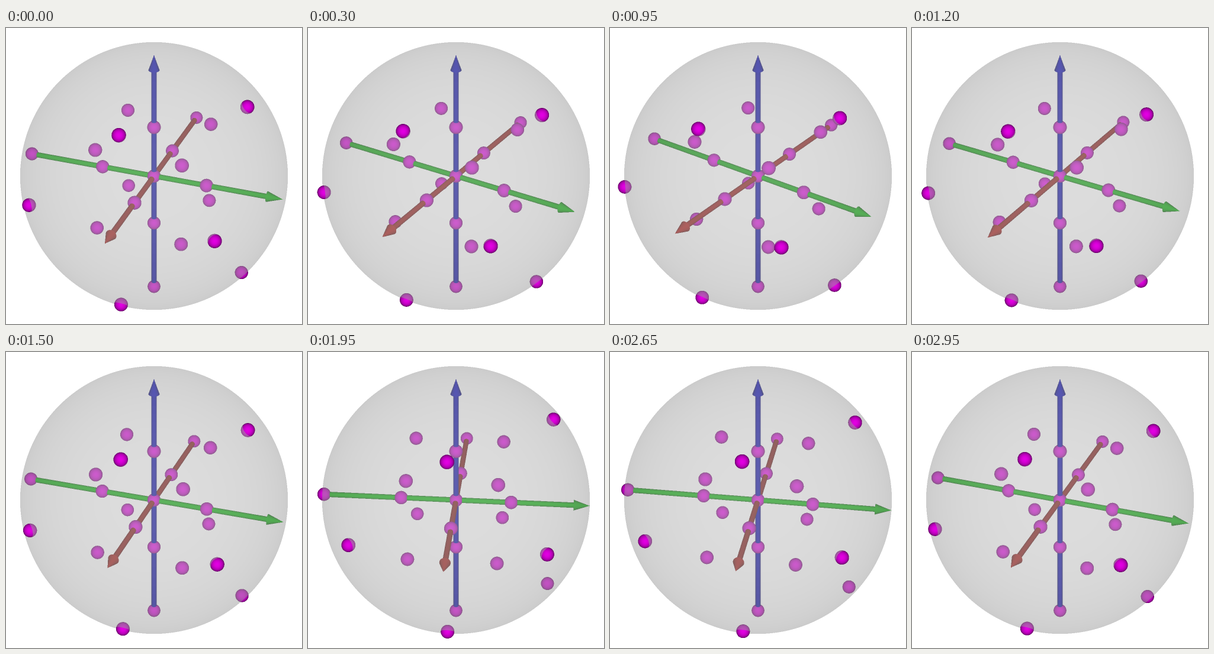
A matplotlib script for the animation above (3000 ms loop, 500x500 px).

```python
"""Octahedral rotation group as modified Rodrigues vectors in a glass unit ball."""
from itertools import product

import matplotlib.pyplot as plt
import numpy as np
from matplotlib.animation import FuncAnimation

SIZE, SS = 500, 2              # stage in pixels, supersampling per axis
FRAMES, INTERVAL = 60, 50
FOCAL, DIST = 2500.0, 11.1     # camera focal length (px) and distance
ELEV = np.radians(30)
MAGENTA = (226, 0, 226)
AXIS_COLORS = ((178, 16, 12), (0, 178, 0), (0, 0, 184))
BALL_R, SHAFT_R, HEAD_R, HEAD_LEN = 0.05, 0.02, 0.04, 0.12
GLASS = 0.5                    # opacity of the unit sphere

N = SIZE * SS
ray = (((np.arange(N) + 0.5) / SS - SIZE / 2) / FOCAL).astype(np.float32)


def rotation_points():
    """Axis times tan(angle / 4) for the 24 rotations of the cube."""
    eye = np.eye(3)
    pts = [np.zeros(3)]
    for e in eye:
        pts += [e * np.tan(np.pi / 8), -e * np.tan(np.pi / 8), -e]
    pts += [np.array(s) / 3 for s in product((-1, 1), repeat=3)]
    for i, j in ((0, 1), (0, 2), (1, 2)):
        pts += [(eye[i] + s * eye[j]) / np.sqrt(2) for s in (-1, 1)]
    return np.array(pts)


def view_matrix(azim):
    """Rows: right, up, towards the camera."""
    c, s = np.cos(azim), np.sin(azim)
    ce, se = np.cos(ELEV), np.sin(ELEV)
    return np.array([[-s, c, 0], [-se * c, -se * s, ce], [ce * c, ce * s, se]])


def azimuth(k):
    """Rock around 20 degrees along two parabolic arcs."""
    x = 2 * k / (FRAMES - 1) - 1
    return np.radians(20 - 17.15 * 4 * x * (1 - abs(x)))


def window(points, radius):
    """Pixel slices that enclose the points padded by a radius."""
    p = np.atleast_2d(points)
    scale = FOCAL / (DIST - p[:, 2])
    pad = radius * scale.max() + 2
    cols = SIZE / 2 + p[:, 0] * scale
    rows = SIZE / 2 - p[:, 1] * scale
    return tuple(slice(max(0, int((v.min() - pad) * SS)),
                       min(N, int((v.max() + pad) * SS) + 1))
                 for v in (rows, cols))


def rays(win):
    return ray[win[1]][None, :], -ray[win[0]][:, None]


def paint(img, depth, win, t, hit, cosine, color):
    d = depth[win]
    hit = hit & (t < d)
    d[hit] = t[hit]
    light = 0.3 + 0.7 * np.clip(cosine[hit], 0, 1)
    img[win][hit] = light[:, None] * np.array(color, np.float32)


def draw_ball(img, depth, center, radius, color):
    win = window(center, radius)
    x, y = rays(win)
    m = np.array([0, 0, DIST]) - center
    a = x * x + y * y + 1
    b = x * m[0] + y * m[1] - m[2]
    disc = b * b - a * (m @ m - radius ** 2)
    root = np.sqrt(np.maximum(disc, 0))
    paint(img, depth, win, (-b - root) / a, disc > 0,
          root / (radius * np.sqrt(a)), color)


def draw_frustum(img, depth, start, axis, length, r0, r1, color):
    win = window([start, start + axis * length], max(r0, r1))
    x, y = rays(win)
    k = (r1 - r0) / length
    g = 1 + k * k
    m = np.array([0, 0, DIST]) - start
    ma = m @ axis
    da = x * axis[0] + y * axis[1] - axis[2]
    dd = x * x + y * y + 1
    a = dd - g * da * da
    b = x * m[0] + y * m[1] - m[2] - da * (g * ma + k * r0)
    c = m @ m - g * ma * ma - 2 * k * r0 * ma - r0 ** 2
    disc = b * b - a * c
    root = np.sqrt(np.maximum(disc, 0))
    t = (-b - root) / a
    s = ma + t * da
    hit = (disc > 0) & (s >= 0) & (s <= length)
    normal = np.maximum(np.abs(r0 + k * s), 1e-4) * np.sqrt(g * dd)
    paint(img, depth, win, t, hit, root / normal, color)


def draw_arrow(img, depth, axis, color, pieces=10):
    neck = 1 - HEAD_LEN
    step = (1 + neck) / pieces
    for i in range(pieces):
        draw_frustum(img, depth, axis * (i * step - 1), axis, step,
                     SHAFT_R, SHAFT_R, color)
    draw_frustum(img, depth, axis * neck, axis, HEAD_LEN, HEAD_R, 0, color)


def glass_layer():
    """Depth of the sphere's near side and its veil of grey light."""
    x, y = rays((slice(None), slice(None)))
    a = x * x + y * y + 1
    disc = DIST ** 2 - a * (DIST ** 2 - 1)
    root = np.sqrt(np.maximum(disc, 0))
    near = np.where(disc > 0, (DIST - root) / a, np.inf)
    veil = 255 * GLASS * (0.58 + 0.15 * root / np.sqrt(a))
    return near.astype(np.float32), veil.astype(np.float32)


POINTS = rotation_points()
NEAR, VEIL = glass_layer()


def render(k):
    view = view_matrix(azimuth(k))
    img = np.full((N, N, 3), 255, np.float32)
    depth = np.full((N, N), 1e6, np.float32)
    for axis, color in zip(view.T, AXIS_COLORS):
        draw_arrow(img, depth, axis, color)
    for p in POINTS @ view.T:
        draw_ball(img, depth, p, BALL_R, MAGENTA)
    behind = depth > NEAR
    img *= np.where(behind, np.float32(1 - GLASS), np.float32(1))[..., None]
    img += np.where(behind, VEIL, np.float32(0))[..., None]
    small = sum(img[i::SS, j::SS] for i in range(SS) for j in range(SS))
    return np.clip(small / SS ** 2 + 0.5, 0, 255).astype(np.uint8)


fig = plt.figure(figsize=(5, 5), dpi=100, facecolor="white")
ax = fig.add_axes([0, 0, 1, 1])
ax.axis("off")
picture = ax.imshow(render(0), interpolation="nearest", aspect="auto")


def update(k):
    picture.set_data(render(k))
    return (picture,)


anim = FuncAnimation(fig, update, frames=FRAMES, interval=INTERVAL,
                     repeat=True, repeat_delay=0, blit=False)
plt.show()
```
